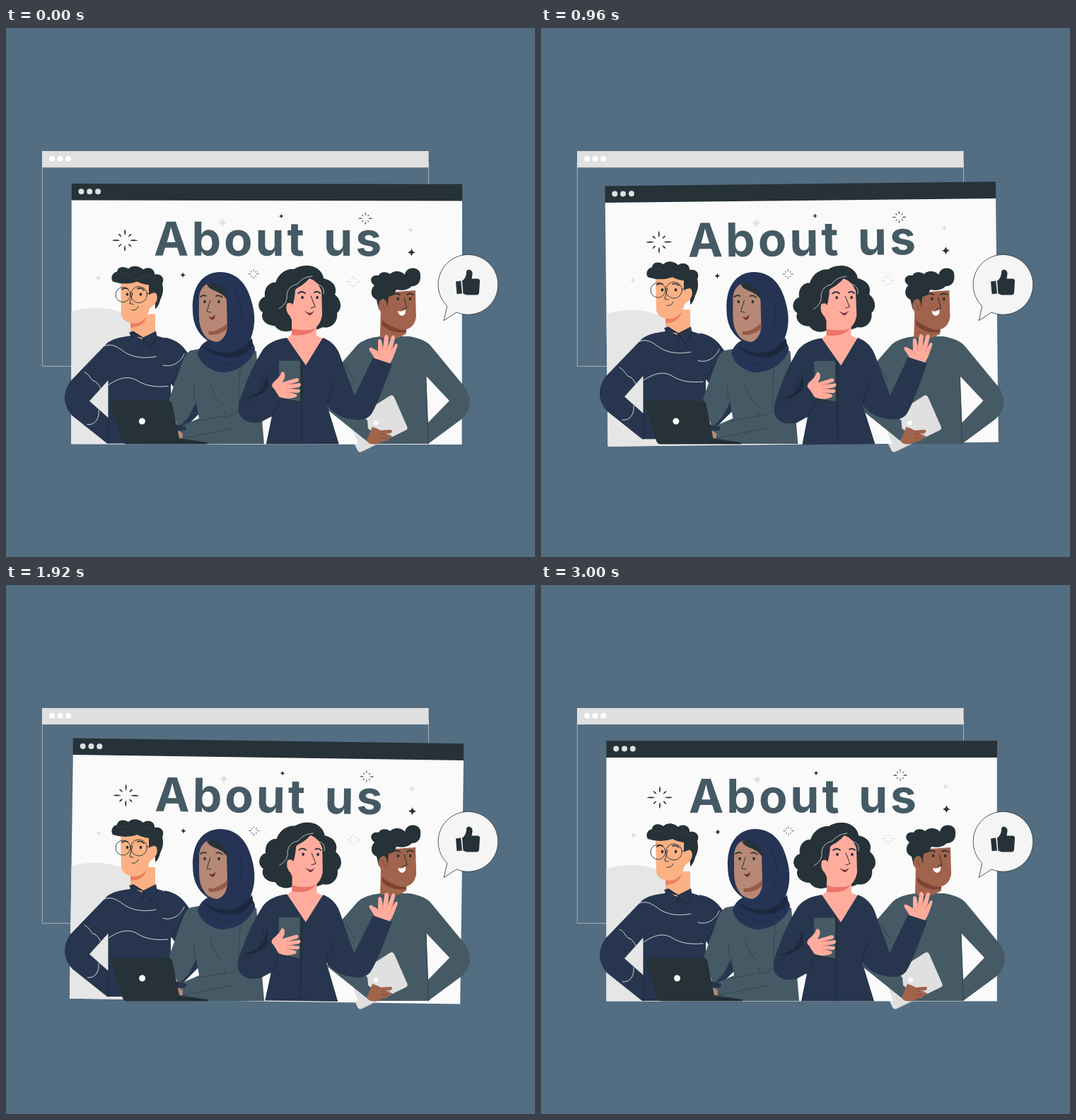
Write an HTML page with a canvas that moves like this. It is 748 px wide and 748 px high and loops after 3.04 s.

```html
<!DOCTYPE html>
<html lang="en">
<head>
<meta charset="utf-8">
<title>About us</title>
<style>
html, body { margin: 0; width: 100%; height: 100%; overflow: hidden; background: #536d82; }
canvas { display: block; width: 748px; height: 748px; }
</style>
</head>
<body>
<canvas id="stage"></canvas>
<script>
const SIZE = 748, LOOP = 3040, CYCLE = 3000, STEP = 1000 / 24;
const INK = '#263238', TEAL = '#455a64', NAVY = '#27364e', DEEP = '#1b283d';
const PALE = '#e0e0e0', PAPER = '#fafafa';
const canvas = document.getElementById('stage');
const ctx = canvas.getContext('2d');
const ratio = window.devicePixelRatio || 1;
canvas.width = canvas.height = SIZE * ratio;

// ---- helpers ----
const cache = {};
const path = d => cache[d] || (cache[d] = new Path2D(d));

function shape(color, d) {
  ctx.fillStyle = color;
  ctx.fill(path(d));
}
function line(color, width, d) {
  ctx.strokeStyle = color;
  ctx.lineWidth = width;
  ctx.stroke(path(d));
}
function dot(color, x, y, r, ry = r) {
  ctx.fillStyle = color;
  ctx.beginPath();
  ctx.ellipse(x, y, r, ry, 0, 0, 7);
  ctx.fill();
}
function ring(x, y, r) {
  ctx.strokeStyle = INK;
  ctx.lineWidth = 0.9;
  ctx.beginPath();
  ctx.arc(x, y, r, 0, 7);
  ctx.stroke();
}
function layer(dx, dy, draw) {
  ctx.save();
  ctx.translate(dx, dy);
  draw();
  ctx.restore();
}
function turned(cx, cy, deg, draw) {
  ctx.save();
  ctx.translate(cx, cy);
  ctx.rotate(deg * Math.PI / 180);
  ctx.translate(-cx, -cy);
  draw();
  ctx.restore();
}
function star(color, x, y, r) {
  ctx.fillStyle = color;
  ctx.beginPath();
  ctx.moveTo(x, y - r);
  for (let i = 0; i < 4; i++) {
    const a = i * Math.PI / 2, b = a + Math.PI / 4;
    ctx.quadraticCurveTo(x + Math.cos(b - Math.PI / 2) * r * 0.2, y + Math.sin(b - Math.PI / 2) * r * 0.2,
      x + Math.cos(a) * r, y + Math.sin(a) * r);
  }
  ctx.fill();
}
function burst(color, x, y, r, w) {
  ctx.fillStyle = color;
  for (let i = 0; i < 8; i++) {
    const out = i % 2 ? r * 0.72 : i % 4 ? r * 0.87 : r;
    const inner = r * 0.36, mid = (inner + out) / 2;
    ctx.save();
    ctx.translate(x, y);
    ctx.rotate(i * Math.PI / 4);
    ctx.beginPath();
    ctx.moveTo(inner, 0);
    ctx.quadraticCurveTo(mid, w, out, 0);
    ctx.quadraticCurveTo(mid, -w, inner, 0);
    ctx.fill();
    ctx.restore();
  }
}

// ---- motion ----
function wind(t) {
  const p = (t / 1500) % 1;
  return p < 0.25 ? p * 4 : p < 0.75 ? 2 - p * 4 : p * 4 - 4;
}
function float(t) {
  const p = (t / 1500) % 1;
  return -10 * (1 - Math.abs(1 - 2 * p));
}
const SHAKE = [0, -1, 2, -4, 4, -4, 4, -4, 2, -1, 0];
function shake(t) {
  const p = Math.min(t / CYCLE, 1) * 10, i = Math.min(Math.floor(p), 9);
  return SHAKE[i] + (SHAKE[i + 1] - SHAKE[i]) * (p - i);
}

// ---- scenery ----
function backWindow() {
  line('#bcc5cb', 0.8, 'M51.3 190V478.3H597.5V190');
  shape(PALE, 'M51 174H597.6V197.3H51Z');
  for (const x of [65, 76.6, 88.2]) dot('#fff', x, 184.8, 4);
}

function frontWindow() {
  shape(PAPER, 'M92.5 221H644.8V588.6H92.5Z');
  ctx.save();
  ctx.clip(path('M92.5 221H644.8V588.6H92.5Z'));
  dot('#e6e6e7', 127, 504, 108);
  ctx.restore();
  shape(INK, 'M92.2 220.3H645V244H92.2Z');
  for (const x of [106.2, 118, 129.8]) dot(PALE, x, 231.6, 4);

  burst(INK, 168, 300.5, 18.5, 2);
  burst(INK, 508, 269, 10.5, 1.3);
  burst(INK, 350, 347.8, 8.5, 0.9);
  burst('#c9cccf', 491, 358.5, 10, 1.1);
  star(PALE, 306, 275.2, 6.5);
  star(PALE, 572, 285, 4.5);
  star(PALE, 130.5, 354, 4.5);
  star(INK, 389, 266, 3.2);
  star(INK, 250, 349.3, 4);
  star(INK, 573.3, 317, 5.8);

  ctx.fillStyle = TEAL;
  ctx.font = '700 66px Inter, "Open Sans", sans-serif';
  ctx.letterSpacing = '4px';
  ctx.textBaseline = 'alphabetic';
  ctx.fillText('About', 209, 322);
  ctx.fillText('us', 449, 322);
}

function bubble() {
  const d = 'M623.5 393A42.4 42.4 0 1 1 637 402L619.5 413.5Z';
  shape('#f5f5f5', d);
  line(INK, 0.8, d);
  shape(INK, 'M636 358.5L643.2 357.5L645 375.6L637.5 376.3Z');
  shape(INK, 'M645 357.5C649 355 651 350 651 345Q651.5 341.3 655 341.8Q660 343 659.5 348L658.5 354.5H667Q670.5 355 670 358.5L669 374Q668.5 377.5 665 377.6L651 377.5L646.4 375.5Z');
}

// ---- people ----
function manWithGlasses() {
  const skin = '#fcb184';
  // far arm, torso, near arm
  shape(NAVY, 'M224 438Q243 441 254 456L290 505Q294 518 283 536L247 572L241 560L258 538L231 500Z');
  shape(NAVY, 'M176 436Q153 438 143 446L91 500Q82 513 83 527Q85 540 94 549L143 588H233V500L252 470Q244 443 214 436ZM145 498V552L118 528Z');
  line(DEEP, 1, 'M145 495V588M252 472L232 506');
  line('#e6e9ec', 0.9, 'M139 450C149 446 157 451 164 456C178 467 195 468 212 465M222 477C233 481 247 474 252 461');
  line('#e6e9ec', 0.9, 'M145 505C160 495 172 492 184 498C199 508 214 508 229 507M111 487C117 489 119 496 123 499Q129 500 134 510M115 561Q124 562 128 555Q132 549 131 541');
  // neck and head
  shape(skin, 'M176 405H211V434L194 441L176 434Z');
  shape('#ed7e61', 'M176 417Q190 418 199 409Q194 424 176 424Z');
  shape(skin, 'M162 359L209 354L213 380Q211 393 203 397Q199 416 183 418Q166 418 163 406Z');
  shape(INK, 'M151 359C147 353 151 346 157 345C158 337 168 337 173 341C180 334 190 338 194 342C202 336 211 342 210 349C220 347 225 355 221 362C223 371 222 377 218 385Q216 394 211 398Q211 388 209 383Q202 383 202 373V364Q190 362 186 359Q169 365 151 359Z');
  shape(skin, 'M203 378Q209 371 213 377Q216 386 208 393Q203 393 202 387Z');
  line('#3d484d', 0.6, 'M157 349Q168 344 176 352T194 352T211 358');
  // glasses and features
  ring(165.5, 377.5, 10.5);
  ring(188, 377.5, 11.5);
  line(INK, 0.9, 'M175 376Q176 374 177 376M199 376L209 375');
  dot(INK, 171.5, 377, 1.8, 2.2);
  dot(INK, 190.5, 377, 1.8, 2.2);
  line(INK, 1.7, 'M164 370Q168 367 172 369M186 369Q191 367 195 371');
  line(INK, 1, 'M179 375L175 390L180 391M178 399Q184 401 187 394');
  // collar
  shape(NAVY, 'M174 431L180 429L194 438L212 429L214 439L203 454L192 438L177 437Z');
  line(DEEP, 1.2, 'M175 437L180 431L194 439L204 453L214 438M194 439V450');
}

function womanWithLaptop() {
  const skin = '#b78876', scarf = '#253454';
  // sweater, leaving the opening by the forearm
  shape(TEAL, 'M261 456Q253 461 249 473L231 524Q230 532 235 541L244 566L248 588H365L354 457Q330 449 300 449ZM269 529L273 552L245 564L258 550Z');
  line('#2f4049', 0.8, 'M289 500Q292 522 308 533M308 542Q313 549 305 549L270 556M333 471Q327 505 330 538Q326 547 309 550M269 529Q264 522 266 505M251 580L320 566');
  // scarf
  shape(scarf, 'M264 397C263 368 276 345 304 345C330 346 343 366 349 393C354 414 350 431 345 441Q353 449 352 456C343 477 324 487 304 487C288 485 272 472 271 459Q275 447 285 442C270 431 264 417 264 397Z');
  shape(DEEP, 'M347 438Q351 445 347 451Q332 470 309 465Q289 462 279 449Q297 461 315 459Q337 456 347 438Z');
  line(DEEP, 0.8, 'M278 458Q291 476 318 476M324 370Q340 397 329 426');
  // face
  shape(skin, 'M273 384Q273 367 286 361Q304 364 312 382L313 423Q311 440 299 444Q287 443 281 435Q273 424 273 407Z');
  shape('#965a48', 'M286 429Q302 429 313 417V425Q303 435 287 434Z');
  shape(INK, 'M284 362C297 357 312 367 314 386Q307 375 294 371Q286 368 284 362Z');
  shape(skin, 'M275 403L300 405Q309 420 296 428Q282 432 276 421Z');
  dot(INK, 281, 387, 1.8, 2.3);
  dot(INK, 301, 387, 1.8, 2.3);
  line(INK, 1.7, 'M275 380Q279 377 283 379M297 379Q302 377 306 381');
  line(INK, 1, 'M289 385L284 401L290 402');
  shape('#7b3030', 'M286 408Q292 411 296 405Q296 412 291 413Z');
  // hand and laptop
  shape(skin, 'M239 570Q246 568 250 574L249 583H241Z');
  shape(NAVY, 'M238 560L255 564L254 569L241 570Z');
  shape(INK, 'M146 527H229Q233 527 235 531L245 580L285 586V588.5H170Q166 588 164 582L148 532Z');
  line('#172126', 0.8, 'M240 584L280 587');
  dot('#fff', 192.5, 556, 4.5);
}

function manWithTablet() {
  const skin = '#a0634c', shade = '#7d4232';
  // tablet
  shape(PALE, 'M482 551L543 520Q547 518 549 522L567 563Q569 567 565 569L503 599Q499 601 497 597L478 557Z');
  line('#b8bcbe', 0.7, 'M550 523L567 563Q569 567 565 569L503 599');
  // body and arms
  shape(TEAL, 'M530 436Q508 438 497 448L459 492Q450 516 455 540L510 584L520 563L490 536L520 510V588H597L643 554Q657 543 656 525Q653 511 644 502L602 451Q594 440 570 436ZM594 492L627 527L597 558Z');
  shape(PALE, 'M510 541L543 520Q547 518 549 522L567 563Q569 567 565 569L534 584L512 566Z');
  line('#2f4049', 0.9, 'M594 490L597 588M480 478L493 500');
  shape(PAPER, 'M455 541L491 569L498 588H471Z');
  dot(PAPER, 523, 558.5, 3.4);
  // hand
  shape(skin, 'M518 564Q525 566 530 569L544 568Q548 570 544 573L535 574L546 577Q546 581 540 580Q541 585 535 584L525 588Q514 590 510 584Z');
  line(shade, 0.7, 'M531 574L543 575M531 579L541 580');
  // neck and head
  shape(skin, 'M530 397H566V432Q550 444 529 437Z');
  shape(shade, 'M532 413Q545 426 566 424V430Q545 433 532 420Z');
  shape(skin, 'M536 374L579 371L580 409Q577 426 561 427Q543 425 536 408Z');
  shape(INK, 'M524 384C513 379 517 367 521 364C512 357 517 348 527 350C529 344 539 344 543 348C549 341 561 344 564 349C566 335 588 337 586 351C587 360 580 366 574 365Q566 373 552 370Q549 379 541 380L539 397L533 399L527 397Z');
  shape(skin, 'M528 387Q534 379 538 387L540 400Q534 407 529 400Q525 393 528 387Z');
  line(shade, 0.8, 'M530 389Q535 390 535 398');
  dot(INK, 554.5, 383, 1.8, 2.2);
  dot(INK, 571.5, 383, 1.8, 2.2);
  line(INK, 1.9, 'M547 377Q552 374 557 377M567 377Q571 374 576 377');
  line(INK, 1, 'M563 381L567 396L561 397');
  shape('#fff', 'M554 400Q560 402 565 398Q566 406 560 407Q555 406 554 400Z');
}

function womanWithPhone() {
  const skin = '#ffac9d', edge = '#e8796d';
  // back hair
  shape(INK, 'M424 336C437 335 448 344 449 354C462 357 469 366 465 377C474 384 476 397 468 403C470 416 459 426 448 423Q430 432 414 420C404 433 386 431 380 421C367 421 359 411 363 402C354 397 356 383 366 380C364 366 374 359 381 360C385 347 397 340 407 341Q415 336 424 336Z');
  // neck and chest
  shape(skin, 'M404 408H439V435L449 440L424 478L396 440L404 433Z');
  shape('#ed746b', 'M404 425Q422 430 438 424Q429 437 404 434Z');
  shape(skin, 'M404 371Q420 365 429 354Q441 358 446 372L447 406Q444 425 428 427Q410 426 402 409Z');
  shape(INK, 'M431 350Q417 361 409 370Q407 394 401 399L395 390Q394 368 409 357Z');
  shape(skin, 'M397 390Q405 386 407 396Q407 409 402 408Q394 401 397 390Z');
  line('#dbe0e3', 0.8, 'M386 397Q399 390 397 376Q399 365 412 362Q419 352 433 351M440 362Q451 365 449 376');
  // face
  dot(INK, 419, 381, 1.8, 2.3);
  dot(INK, 440, 381, 1.8, 2.3);
  line(INK, 1.8, 'M413 375Q418 371 423 375M436 374Q440 371 444 375');
  line(INK, 1, 'M431 379L437 394L431 396');
  shape('#a92e3c', 'M424 401Q430 405 434 401Q433 407 428 406Z');
  line(INK, 0.9, 'M423 401Q430 407 435 401');
  // dress
  shape(NAVY, 'M397 438Q374 441 363 455Q344 486 335 515Q326 535 330 547Q339 562 361 557L376 549L368 588.5H471L454 533Q467 551 489 553Q506 557 515 548Q523 539 546 475L519 466L493 520L472 462Q465 444 448 438L424 477Z');
  line(DEEP, 1, 'M418 528V588M454 533Q456 520 465 502M365 491L357 517Q343 529 334 532M376 550Q382 542 386 527');
  shape(DEEP, 'M369 486Q367 507 356 516L336 524Q366 520 371 507Z');
  // phone and its hand
  shape(INK, 'M412 471L420 472V526Q420 529 416 529L388 526Z');
  shape(TEAL, 'M386 472Q386 470.5 388 470.5H414Q416 470.5 416 473V528L388 523Q386 523 386 520Z');
  shape(skin, 'M379 510Q374 507 378 501Q388 493 390 486Q396 486 394 495L391 501L411 495Q416 496 413 500L401 504L416 502Q419 505 414 508L401 510L415 511Q418 515 412 516L400 515L411 518Q413 522 406 523Q395 526 386 521Z');
  line(edge, 0.7, 'M396 505L405 502M398 510H407M397 515L406 516');
  // raised hand
  shape(skin, 'M521 467Q518 461 514 456Q512 451 517 452L526 457L526 442Q528 437 531 442L533 452L535 436Q538 431 541 437L540 451L545 436Q549 432 550 438L546 454L550 447Q555 444 553 451L547 467L543 474Z');
  line(edge, 0.7, 'M533 450L532 456M540 449L538 456M546 452L543 459M526 457L530 463');
}

// ---- playback ----
function render(now) {
  const n = Math.floor((now % LOOP + 4) / STEP);
  const t = Math.min(n * STEP + 30, CYCLE);
  const sway = wind(t), side = shake(t);

  ctx.setTransform(ratio, 0, 0, ratio, 0, 0);
  ctx.lineCap = ctx.lineJoin = 'round';
  ctx.fillStyle = '#536d82';
  ctx.fillRect(0, 0, SIZE, SIZE);

  backWindow();
  turned(368.6, 404.4, sway, frontWindow);
  layer(0, float(t), manWithGlasses);
  layer(side, 0, womanWithLaptop);
  layer(side, 0, manWithTablet);
  turned(442, 462, sway, womanWithPhone);
  bubble();
}

const start = performance.now();
function tick(now) {
  render(Math.max(0, now - start));
  requestAnimationFrame(tick);
}
render(0);
requestAnimationFrame(tick);
</script>
</body>
</html>
```
